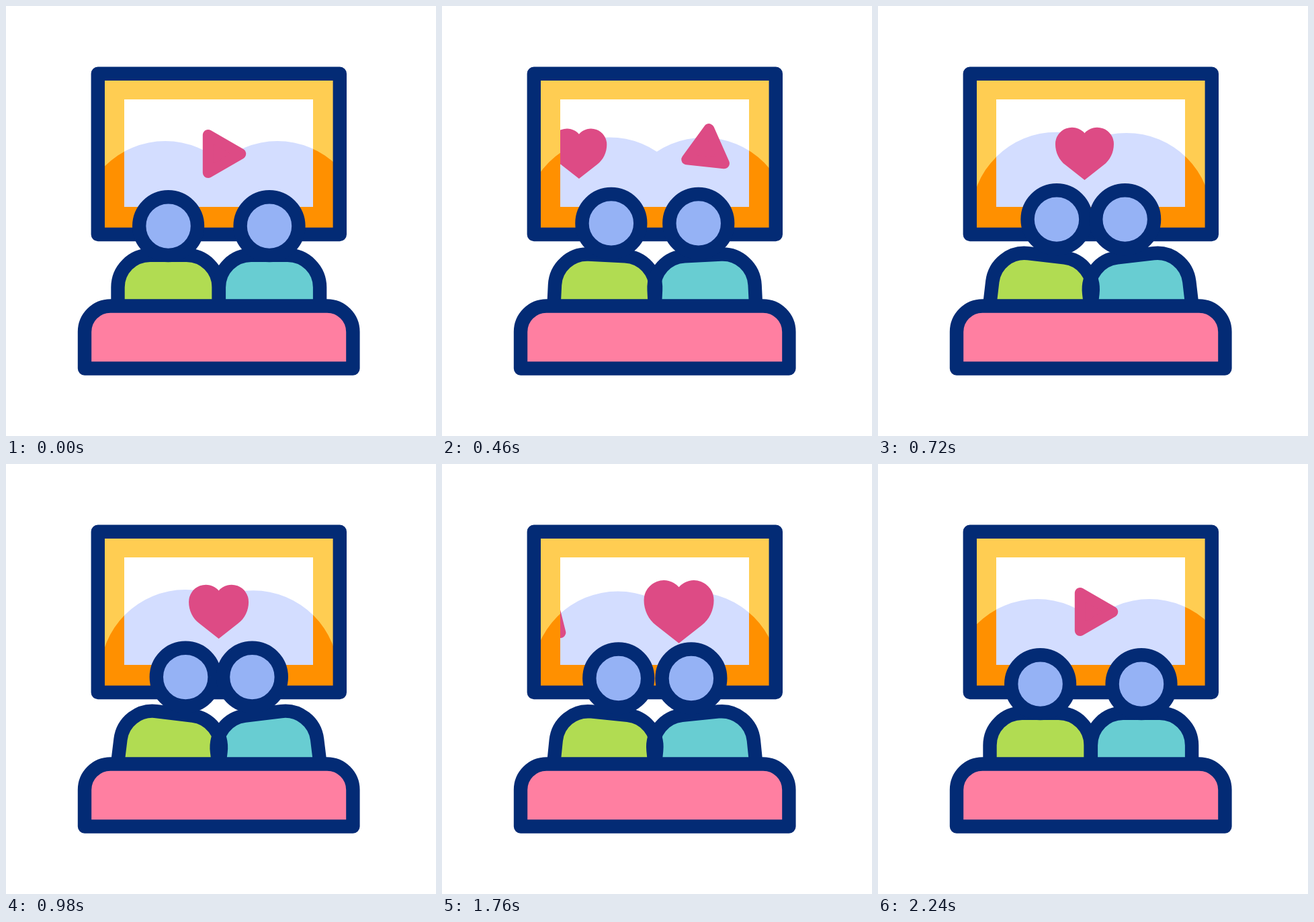
Recreate the animation shown at these times as an HTML page with a canvas. Size 640 px wide and 640 px high, loop 2400 ms.

```html
<!DOCTYPE html>
<html lang="en">
<head>
<meta charset="utf-8">
<title>Movie night</title>
<style>
  html, body { margin: 0; width: 100%; height: 100%; overflow: hidden; background: #fff; }
  canvas { display: block; width: 640px; height: 640px; }
</style>
</head>
<body>
<canvas id="stage" width="640" height="640"></canvas>
<script>
const canvas = document.getElementById('stage');
const ctx = canvas.getContext('2d');
const ratio = window.devicePixelRatio || 1;
canvas.width = canvas.height = 640 * ratio;

const LOOP = 2400, STEP = 20, LINE = 20.4;
const COLOR = {
  navy: '#032b75', yellow: '#ffcd52', orange: '#ff9000', white: '#fff',
  haze: '#d3ddff', pink: '#dd4b85', head: '#95b2f5',
  green: '#b1dc52', teal: '#68cdd2', sofa: '#ff7fa1'
};
const HEART_BEAT = [[200, 1], [400, .85], [600, 1.2], [800, .85], [1000, 1]];

const mix = (a, b, k) => a + (b - a) * k;

function ease(t, start, end) {
  const p = Math.min(1, Math.max(0, (t - start) / (end - start)));
  return p * p * (3 - 2 * p);
}

// The beat runs forwards on entry and mirrored on exit.
function heartScale(t) {
  const time = Math.min(t, LOOP - t);
  let scale = HEART_BEAT[0][1];
  for (let i = 1; i < HEART_BEAT.length; i++) {
    const [t0] = HEART_BEAT[i - 1], [t1, s1] = HEART_BEAT[i];
    scale = mix(scale, s1, ease(time, t0, t1));
  }
  return scale;
}

function fill(path, color) {
  ctx.fillStyle = color;
  ctx.fill(path);
}

function outline(path, color = COLOR.navy, width = LINE) {
  ctx.strokeStyle = color;
  ctx.lineWidth = width;
  ctx.lineJoin = 'round';
  ctx.stroke(path);
}

function at(x, y, degrees, scale, draw) {
  ctx.save();
  ctx.translate(x, y);
  ctx.rotate(degrees * Math.PI / 180);
  ctx.scale(scale, scale);
  draw();
  ctx.restore();
}

function clipped(path, draw) {
  ctx.save();
  ctx.clip(path);
  draw();
  ctx.restore();
}

function rect(x, y, w, h) {
  const path = new Path2D();
  path.rect(x, y, w, h);
  return path;
}

function circle(x, y, r) {
  const path = new Path2D();
  path.arc(x, y, r, 0, Math.PI * 2);
  return path;
}

// Box with only its top corners rounded.
function arch(left, top, right, bottom, r) {
  const path = new Path2D();
  path.moveTo(left, bottom);
  path.lineTo(left, top + r);
  path.arc(left + r, top + r, r, Math.PI, Math.PI * 1.5);
  path.lineTo(right - r, top);
  path.arc(right - r, top + r, r, Math.PI * 1.5, 0);
  path.lineTo(right, bottom);
  path.closePath();
  return path;
}

const frame = rect(136.8, 100.7, 360, 239.3);
const picture = rect(176, 139, 281, 160);
const body = arch(-75.1, -76.2, 75.1, 20, 48);
const sofa = arch(117, 446.5, 516.4, 539.5, 38.5);
const playIcon = new Path2D('M-24.2-28V28L24.3 0Z');
const heart = new Path2D(
  'M0-31.5A25.5 25.5 0 0 0-44.7-14.7C-44.7-2-39 10-29 17.5L0 40.3' +
  'L29 17.5C39 10 44.7-2 44.7-14.7A25.5 25.5 0 0 0 0-31.5Z');

function drawScreen(t, enter, leave) {
  const lean = enter - leave;
  const hills = new Path2D();
  hills.addPath(circle(mix(237, 267, lean), mix(328, 314, lean), 127));
  hills.addPath(circle(mix(404, 368, lean), mix(328, 315.3, lean), 127));

  clipped(frame, () => {
    fill(frame, COLOR.yellow);
    fill(hills, COLOR.orange);
  });
  clipped(picture, () => {
    fill(picture, COLOR.white);
    fill(hills, COLOR.haze);
    const returning = t >= LOOP / 2;
    const playX = returning ? mix(120, 325, leave) : mix(325, 513, enter);
    const turn = returning ? -90 * (1 - leave) : 90 * enter;
    at(playX, 220, turn, 1, () => {
      fill(playIcon, COLOR.pink);
      outline(playIcon, COLOR.pink, 16);
    });
    const heartX = mix(128.6, 316.6, enter) + 205 * leave;
    at(heartX, 219.8, 0, heartScale(t), () => fill(heart, COLOR.pink));
  });
  outline(frame);
}

function drawPeople(lean) {
  const people = [
    { x: 241.6, side: 1, color: COLOR.green },
    { x: 392, side: -1, color: COLOR.teal }
  ];
  const eachBody = draw => people.forEach(p =>
    at(p.x, 447, 7 * lean * p.side, 1, () => draw(p)));

  eachBody(p => fill(body, p.color));
  eachBody(() => outline(body));
  for (const p of people) {
    const head = circle(p.x + 25.6 * lean * p.side, 327.6 - 10.5 * lean, 43.4);
    fill(head, COLOR.head);
    outline(head);
  }
}

function render(t) {
  const enter = ease(t, 200, 800);
  const leave = ease(t, 1600, 2200);
  ctx.setTransform(ratio, 0, 0, ratio, 0, 0);
  ctx.fillStyle = COLOR.white;
  ctx.fillRect(0, 0, 640, 640);
  drawScreen(t, enter, leave);
  drawPeople(enter - leave);
  fill(sofa, COLOR.sofa);
  outline(sofa);
}

function tick() {
  const t = performance.now() % LOOP;
  render(Math.floor(t / STEP) * STEP);
  requestAnimationFrame(tick);
}
tick();
</script>
</body>
</html>
```
